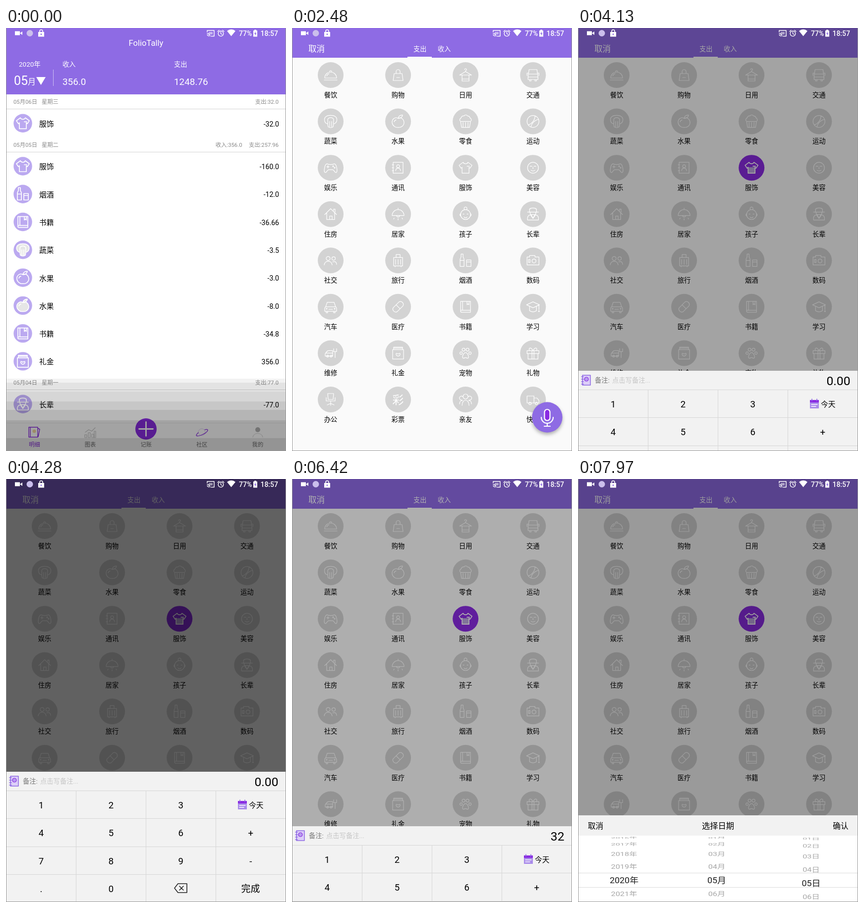
Write an HTML page with a canvas that moves like this. It is 565 px wide and 854 px high and loops after 8 s.

```html
<!DOCTYPE html>
<html lang="zh">
<head>
<meta charset="utf-8">
<style>
html, body { margin: 0; width: 100%; height: 100%; overflow: hidden; background: #fff; }
canvas { display: block; }
</style>
</head>
<body>
<canvas id="stage" width="565" height="854"></canvas>
<script>
const W = 565, H = 854, LOOP = 8000;
const HEAD = '#8e6be4', ACTIVE = '#8a2be2', PANEL = '#f2f2f2';
const FONT = 'Roboto, "Noto Sans CJK SC", "Noto Sans CJK", "Noto Sans", sans-serif';

const screen = document.getElementById('stage').getContext('2d');
const layer = document.createElement('canvas');
layer.width = W;
layer.height = H;
let g = screen;

const clamp = (v, a = 0, b = 1) => Math.min(b, Math.max(a, v));
const ease = u => (1 - Math.cos(Math.PI * clamp(u))) / 2;
// index of the current step when n changes are spread evenly from t0 to t1
const stepAt = (t, t0, t1, n) => Math.min(n - 1, Math.floor((t - t0) / (t1 - t0) * (n - 1) + 0.001));

function rect(x, y, w, h, color) {
  g.fillStyle = color;
  g.fillRect(x, y, w, h);
}
function disc(x, y, r, color) {
  g.fillStyle = color;
  g.beginPath();
  g.arc(x, y, r, 0, 7);
  g.fill();
}
// y is the visual middle of the glyphs
function text(s, x, y, size, color, align = 'left', weight = 400) {
  g.font = `${weight} ${size}px ${FONT}`;
  g.textAlign = align;
  g.fillStyle = color;
  g.fillText(s, x, y + size * 0.37);
}
function shape(path, x, y, stroke, width = 1.4, fill) {
  g.save();
  g.translate(x, y);
  g.lineJoin = g.lineCap = 'round';
  g.lineWidth = width;
  const p = new Path2D(path);
  if (fill) { g.fillStyle = fill; g.fill(p); }
  if (stroke) { g.strokeStyle = stroke; g.stroke(p); }
  g.restore();
}

const ring = (x, y, r) => `M${x - r} ${y}a${r} ${r} 0 1 0 ${2 * r} 0a${r} ${r} 0 1 0 ${-2 * r} 0`;
const box = (x, y, w, h) => `M${x} ${y}h${w}v${h}h${-w}z`;

const ICONS = {
  餐饮: 'M-13 10H13M-12 6a12 12 0 0 1 24 0zM-2-7a2 2 0 0 1 4 0M-8 2a8 8 0 0 1 5-5',
  购物: 'M-8-3H8L10 11H-10zM-4-3v-4a4 4 0 0 1 8 0v4M-3 5H3',
  日用: 'M0-9a2 2 0 1 0-2-2M0-9V-7L12 0H-12L0-7M-7 0V12H7V0M-7 8H7',
  交通: 'M-8-11H8L10 4H-10zM-10 4V9H10V4M-7 9v3h3v-3M4 9v3h3v-3M-10-4h-2v5M10-4h2v5M-9-2H9',
  蔬菜: 'M-6 5C-13 4-15-6-9-10C-5-13 5-13 9-10C15-6 13 4 6 5L5 11C2 13-2 13-5 11zM-6 5C-4 1-8-2-5-6C-2-8 2-8 5-6C8-2 4 1 6 5M-2 0V11M2 0V11',
  水果: 'M0-6C-5-10-13-5-12 3C-11 9-5 13 0 12C6 13 12 9 12 2C11-6 5-9 0-6zC0-10 4-13 9-13C9-9 5-6 0-6M-8 1a5 5 0 0 1 4-4',
  零食: 'M-10 0H10L8 12H-8zM-11-1a4 4 0 0 1 2-6a5 5 0 0 1 6-4a4 4 0 0 1 7 0a5 5 0 0 1 5 4a4 4 0 0 1 2 6M-5 2V11M0 2V11M5 2V11',
  运动: ring(0, 0, 12) + 'M-9 7C-3 5 4-2 4-11M-4 11C-3 4 4-3 11-4',
  娱乐: 'M-7-8C-12-8-14 6-12 9C-9 12-7 4-4 4H4C7 4 9 12 12 9C14 6 12-8 7-8C4-6-4-6-7-8zM-8-2h5M-5.5-4.5v5' + ring(5, -3, 1) + ring(8, 0, 1),
  通讯: box(-10, -11, 20, 22) + ring(0, -3, 3) + 'M-5 6C-4-1 4-1 5 6M-12-6h3M-12 0h3M-12 6h3',
  服饰: 'M-5-11C-3-7 3-7 5-11L13-5L9 1L7-1V11H-7V-1L-9 1L-13-5zM3-3h5',
  美容: ring(0, 0, 11) + 'M-6-3h4M2-3h4M-4 5C-2 7 2 7 4 5M0-1v3',
  住房: 'M-12 1L0-11L12 1M-8-2V11H8V-2M-2 11V4H3V11M6-7v-3h3v6',
  居家: 'M0-12V-9M-12 3a12 12 0 0 1 24 0zM-3 3a3 3 0 0 0 6 0M-8 8l-1 2M0 9v3M8 8l1 2',
  孩子: ring(0, 1, 10) + 'M-10-1a3 3 0 0 0 0 5M10-1a3 3 0 0 1 0 5M-3 6C-1 8 1 8 3 6M-2-9a3 3 0 1 1 4 0M-5 0h2M3 0h2',
  长辈: 'M-11-4H11M-7-4V-10C-4-13 4-13 7-10V-4M-6-4C-6 3-2 5 0 9C2 5 6 3 6-4M-6 2C-8 2-12 4-11 12H11C12 4 8 2 6 2M-4 1H4L0 8z',
  社交: ring(-5, -4, 4) + ring(6, -4, 3.5) + 'M-13 9C-12-1 2-1 3 9M4 3C10 1 12 4 12 8',
  旅行: box(-9, -6, 18, 17) + 'M-4-6v-6h8v6M-5-2V8M5-2V8M0-2V8M-6 11v2M6 11v2',
  烟酒: 'M-11 12V-2C-11-5-9-5-9-8V-13H-5V-8C-5-5-3-5-3-2V12zM2 12V-1H11V12zM2 3H11M-11 0h8',
  数码: 'M-12-7H-7V-10H4V-7H12V9H-12z' + ring(2, 1, 4) + box(-9, -2, 3, 6),
  汽车: 'M-10 0L-7-9H7L10 0C12 1 12 3 12 9H-12C-12 3-12 1-10 0H10M-9 9v3h3v-3M6 9v3h3v-3M-4 5H4' + ring(-8, 4, 1) + ring(8, 4, 1),
  医疗: 'M-10 2L2-10a6 6 0 0 1 8 8L-2 10a6 6 0 0 1-8-8zM-4-4L4 4',
  书籍: 'M-10-11H10V11H-8a2 2 0 0 1-2-2zM-6-11V7M-10 7H10M3-11V-4L5-6L7-4V-11',
  学习: 'M-13-4L0-10L13-4L0 2zM-7 0V8C-3 11 3 11 7 8V0M12-3V6' + ring(12, 9, 1),
  维修: 'M-11 6V1C-9-1-8-5-4-5H4V6zM-10 0H4' + ring(-6, 6, 2) + ring(1, 6, 2) + 'M6-9v6h6v-6M9-3V9',
  礼金: box(-11, -7, 22, 19) + 'M-9-7V-12H9V-7M-9-10H9M-4 2a4 4 0 0 0 8 0C5 0 2 0 0 2C-2 0-5 0-4 2',
  宠物: ring(-9, 0, 2.5) + ring(-4, -7, 3) + ring(4, -7, 3) + ring(9, 0, 2.5) + 'M0-1C4-1 8 8 5 10C3 11 2 9 0 9C-2 9-3 11-5 10C-8 8-4-1 0-1z',
  礼物: box(-12, -5, 24, 6) + box(-10, 1, 20, 11) + 'M-2-5V12M2-5V12M0-5C-4-13-10-11-7-5M0-5C4-13 10-11 7-5',
  办公: 'M-6-12H6L5 0H-5zM-9-4V3H9V-4M0 3V8M-7 11L0 8L7 11M0 8V12',
  亲友: ring(0, -6, 5) + 'M-7 12C-7-2 7-2 7 12M-6 2C-9 2-12 3-12 9M6 2C9 2 12 3 12 9M-5-5a4 4 0 1 0-2 6M5-5a4 4 0 1 1 2 6',
  快递: box(-12, -7, 14, 14) + 'M2-3H8L12 2V7H2' + ring(-6, 8, 2.5) + ring(7, 8, 2.5),
};
const CATEGORIES = ('餐饮 购物 日用 交通 蔬菜 水果 零食 运动 娱乐 通讯 服饰 美容 住房 居家 孩子 长辈 ' +
  '社交 旅行 烟酒 数码 汽车 医疗 书籍 学习 维修 礼金 宠物 礼物 办公 彩票 亲友 快递').split(' ');

const DAYS = [
  { y: 149, date: '05月06日', week: '星期三', out: '32.0', rows: [['服饰', '-32.0']] },
  { y: 235.7, date: '05月05日', week: '星期二', out: '257.96', income: '356.0', rows: [
    ['服饰', '-160.0'], ['烟酒', '-12.0'], ['书籍', '-36.66'], ['蔬菜', '-3.5', 1],
    ['水果', '-3.0'], ['水果', '-8.0', 1], ['书籍', '-34.8'], ['礼金', '356.0']] },
  { y: 716, date: '05月04日', week: '星期一', out: '77.0', rows: [['长辈', '-77.0']] },
];

function statusBar() {
  rect(18, 6.5, 10, 8, '#fff');
  shape('M28 10.5L33 7V14z', 0, 0, null, 1, '#fff');
  disc(48, 10.5, 6.5, '#cbbfec');
  rect(65, 8, 12, 9.5, '#fff');
  shape('M68 8V6.5a3 3 0 0 1 6 0V8', 0, 0, '#fff', 1.6);
  disc(71, 12.7, 1.4, HEAD);
  shape('M406 8V5H420V16.5H414M406 11a5.5 5.5 0 0 1 5.5 5.5M406 14a2.5 2.5 0 0 1 2.5 2.5', 0, 0, '#fff', 1.5);
  rect(409, 8, 8, 5, 'rgba(255,255,255,.5)');
  shape(ring(433.5, 11.3, 5.3) + 'M433.5 8V11.5L436 13M427 7l3-2.5M440 7l-3-2.5', 0, 0, '#fff', 1.4);
  shape('M446 6Q454.5-.5 463 6L454.5 16.5z', 0, 0, null, 1, '#fff');
  text('77%', 470, 10.5, 14, '#fff', 'left', 500);
  rect(501, 3.5, 4, 2, '#fff');
  rect(499, 5, 8, 12.5, '#fff');
  shape('M503.5 7L501 12H503V15.5L505.5 10.5H503.5z', 0, 0, null, 1, HEAD);
  text('18:57', 549, 10.5, 14, '#fff', 'right', 500);
}

function listHeader() {
  rect(0, 0, W, 134, HEAD);
  text('FolioTally', 282.5, 30, 16.6, '#fff', 'center');
  text('2020年', 26, 73.5, 13.5, '#fff');
  text('05', 16, 106, 25, '#fff');
  text('月', 44, 108, 16, '#fff');
  shape('M61 99H80L70.5 115z', 0, 0, null, 1, '#fff');
  rect(95, 84, 1, 33, '#cdbff3');
  text('收入', 114, 73.5, 13.3, '#fff');
  text('356.0', 114, 108, 18.9, '#fff');
  text('支出', 339, 73.5, 13.3, '#fff');
  text('1248.76', 339, 108, 18.9, '#fff');
}

function dayGroup({ y, date, week, out, income, rows }) {
  const small = (s, x, align) => text(s, x, y, 11.3, '#8a8a8a', align);
  small(date, 15);
  small(week, 72);
  small('支出:' + out, 550, 'right');
  if (income) small('收入:' + income, 476.5, 'right');
  rect(0, Math.round(y + 14), W, 1, '#d4d4d4');
  rows.forEach(([name, sum, filled], i) => {
    const cy = y + 43.3 + i * 56.27;
    disc(34, cy, 18.7, '#bba9f0');
    shape(ICONS[name], 34, cy, '#fff', 1.7, filled && '#e6e6e6');
    text(name, 67, cy + 1, 14.7, '#000');
    text(sum, 551, cy + 1, 14.1, '#000', 'right');
  });
}

function navBar() {
  rect(0, 797, W, 57, '#fff');
  rect(0, 797, W, 1, '#ececec');
  ['明细', '图表', '记账', '社区', '我的'].forEach((s, i) =>
    text(s, 57.5 + i * 112.6, 841, 11.3, i ? '#707070' : ACTIVE, 'center'));
  shape('M-11-10H7V10H-11zM-8-10V10M7-8L11-6L8 9', 57, 816, ACTIVE, 1.4);
  disc(57, 814, 3.5, '#f3d9a0');
  shape(box(-11, 5, 4, 6) + box(-4, 1, 4, 10) + box(3, 4, 4, 7) + box(8, -2, 3, 13) + 'M-10 0L-3-5L3-2L10-9', 170, 816, '#c4c4c4', 1.2);
  disc(282.5, 809.5, 21.5, ACTIVE);
  shape('M-14 0H14M0-14V14', 282.5, 809.5, '#fff', 2.8);
  shape(ring(0, 0, 7), 395, 816, '#dccdf0', 1);
  shape('M-7 1C-16 9-8 9 1 5C13 0 16-8 6-5', 395, 816, ACTIVE, 1.3);
  shape('M-10 10C-8 0 8 0 10 10', 508, 816, '#d4d4d4', 1.2);
  disc(508, 811, 5, '#b4b4b4');
}

function listPage() {
  rect(0, 0, W, H, '#fff');
  listHeader();
  DAYS.forEach(dayGroup);
  navBar();
}

// stepped shade at the foot of the screen; only its lower part clears early
function footShade(t) {
  const tops = [708, 716, 734, 754, 771, 792, 828, H];
  const alphas = [.05, .11, .16, .22, .29, .36, .42];
  const left = 1 - (stepAt(t, 60, 610, 12) + 1) / 12;
  alphas.forEach((a, i) => {
    const k = tops[i] < 754 ? 1 : clamp(left);
    rect(0, tops[i], W, tops[i + 1] - tops[i], `rgba(0,0,0,${a * k})`);
  });
}

function micButton(x, y) {
  g.save();
  g.shadowColor = 'rgba(0,0,0,.3)';
  g.shadowBlur = 7;
  g.shadowOffsetY = 4;
  disc(x, y, 30.7, HEAD);
  g.restore();
  shape('M-5.5-8.5a5.5 5.5 0 0 1 11 0V3a5.5 5.5 0 0 1-11 0z', x, y - 2, '#fff', 2.2, ACTIVE);
  shape('M-12 0a12 12 0 0 0 24 0M0 12V18M-6 18H6', x, y, '#fff', 2.2);
}

function categoryPage(selected) {
  rect(0, 0, W, H, '#fafafa');
  rect(0, 0, W, 60, HEAD);
  text('取消', 33, 42, 16.6, '#fff');
  text('支出', 245, 42, 13.2, '#fff');
  text('收入', 294, 42, 13.2, '#fff');
  rect(233, 58, 49, 2, '#fff');
  CATEGORIES.forEach((name, i) => {
    const x = 78 + (i % 4) * 136.1, y = 95 + Math.floor(i / 4) * 93.57;
    const on = name === selected;
    disc(x, y, 26, on ? ACTIVE : 'lightgray');
    if (on) rect(x - 7, y - 1, 14, 12, '#b9a6de');
    if (ICONS[name]) shape(ICONS[name], x, y, '#fff', on ? 1.7 : 1.2);
    else text('彩', x, y, 23, '#fff', 'center');
    text(name, x, y + 40, 13.3, '#000', 'center');
  });
  micButton(515, 786);
}

function keypad(top, amount) {
  rect(0, top, W, H, PANEL);
  shape(box(-7, -10, 16, 20) + 'M-9-7h4M-9-2h4M-9 3h4M-9 8h4', 16, top + 19, HEAD, 1.5, '#dccff8');
  shape(ring(1, -2, 4), 16, top + 19, ACTIVE, 1.2, '#b79cf0');
  text('备注:', 34, top + 19, 13.3, '#777');
  text('点击写备注...', 69, top + 19, 13.3, '#c6c6c6');
  text(amount, 549.5, top + 20, 24.6, '#000', 'right');
  for (let r = 0; r < 4; r++) rect(0, top + 38 + Math.round(r * 56.3), W, 1, '#d6d6d6');
  for (let c = 1; c < 4; c++) rect(c * 141, top + 38, 1, H, '#d6d6d6');
  [...'123 456+789-.0  '].forEach((key, i) => {
    const x = 71 + (i % 4) * 140.9, y = top + 67.3 + Math.floor(i / 4) * 56.3;
    if (key !== ' ') text(key, x, y, 18.6, '#000', 'center');
  });
  const cal = top + 67;
  rect(468, cal - 8, 18, 17, '#a98bea');
  rect(468, cal - 8, 18, 5, ACTIVE);
  shape('M472-10v4M482-10v4', 0, cal, HEAD, 1.6);
  shape('M471 1H483M471 5H480', 0, cal, '#fff', 1.4);
  text('今天', 490, top + 67.5, 14.7, '#000');
  shape('M-13 0L-6-9H12V9H-6zM-3-4L5 4M5-4L-3 4', 353, top + 235, '#222', 1.6);
  text('完成', 493.5, top + 236, 19, '#000', 'center');
}

function wheel(x, mid, value, unit, first) {
  const R = 90, PITCH = Math.PI / 10;
  const draw = (y0, y1, central) => {
    g.save();
    g.beginPath();
    g.rect(0, y0, W, y1 - y0);
    g.clip();
    for (let n = Math.max(first, Math.ceil(value - 4.7)); n <= value + 4.7; n++) {
      const a = (n - value) * PITCH;
      g.save();
      g.translate(x, mid + R * Math.sin(a));
      g.scale(central ? 1.1 : 1, Math.cos(a) * (central ? 1 : 0.8));
      text(String(n).padStart(2, '0') + unit, 0, 0, 16.3, central ? '#1c1c1c' : '#a8a8a8', 'center');
      g.restore();
    }
    g.restore();
  };
  draw(mid - 90, mid - 14, false);
  draw(mid - 14, mid + 14, true);
  draw(mid + 14, mid + 90, false);
}

function datePicker(top, day) {
  rect(0, top, W, H, '#fff');
  rect(0, top, W, 41, PANEL);
  text('取消', 20, top + 21, 15.6, '#000');
  text('选择日期', 282.5, top + 21, 16.3, '#000', 'center');
  text('确认', 545.5, top + 21, 15.6, '#000', 'right');
  const mid = top + 131;
  rect(0, mid - 15, W, 1, '#dcdcdc');
  rect(0, mid + 14, W, 1, '#dcdcdc');
  wheel(93, mid, 2020, '年', 1900);
  wheel(280, mid, 5, '月', 1);
  wheel(470.5, mid, day, '日', 1);
}

const dim = a => rect(0, 0, W, H, `rgba(0,0,0,${a})`);

function openPage(t) {
  const k = stepAt(t, 2100, 2330, 5);
  const elapsed = k * 57.5;
  g = layer.getContext('2d');
  categoryPage();
  g = screen;
  g.globalAlpha = k > 3 ? 1 : 1 - (1 - clamp((28 + elapsed) / 200)) ** 2;
  g.drawImage(layer, 0, Math.round(68.3 * (1 - (12 + elapsed) / 350) ** 5));
  g.globalAlpha = 1;
}

function entry(t) {
  const now = 3720 + 56 * stepAt(t, 3720, 4280, 11);
  const u = clamp((now - 3885) / 395);
  categoryPage('服饰');
  dim(0.61 * u);
  if (u > 0) keypad(Math.round(H - 263 * ease(u)), t < 5320 ? '0.00' : t < 5600 ? '3' : '32');
}

function swapSheets(t) {
  const k = stepAt(t, 6250, 6640, 5);
  const day = t < 7640 ? 6 : 6 - 0.2033 * (stepAt(t, 7640, 7970, 6) + 1);
  categoryPage('服饰');
  dim(0.46 * clamp(1 - k / 3) + 0.385 * clamp((k - 1) / 3));
  if (k < 3) keypad(Math.round(H - 263 + 263 * ease(0.118 + 0.33 * k)), '32');
  if (k > 1) datePicker(Math.round(H - 221.5 * ease(0.698 - 0.3 * (4 - k))), day);
}

function render(t) {
  if (t < 2330) {
    listPage();
    if (t < 2100) footShade(t);
    else openPage(t);
  } else if (t < 3720) categoryPage();
  else if (t < 6250) entry(t);
  else swapSheets(t);
  statusBar();
  rect(0, 0, 1, H, '#999');
  rect(W - 1, 0, 1, H, '#999');
  rect(0, H - 1, W, 1, '#999');
}

const start = performance.now();
function tick() {
  render((performance.now() - start) % LOOP);
  requestAnimationFrame(tick);
}
tick();
</script>
</body>
</html>
```
